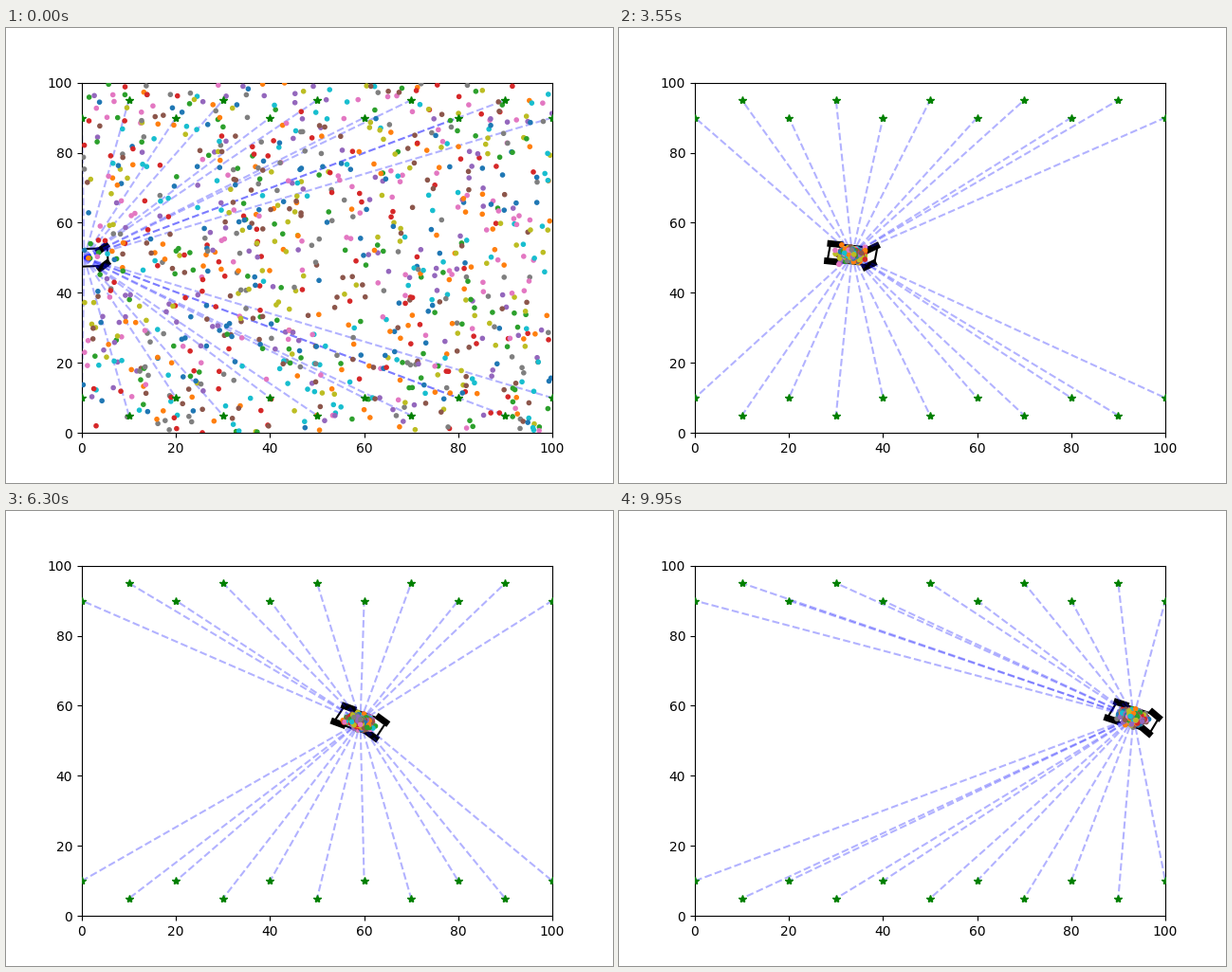
A matplotlib script for the animation above (10 s loop, 640 by 480 pixels).

```python
import numpy as np
import matplotlib.pyplot as plt
from matplotlib.animation import FuncAnimation

FRAMES = 200
INTERVAL = 50
COUNT = 1000
SPEED = 0.5
WHEELBASE = 10
MAX_STEER = 0.75
STEER_PERIOD = 75

BODY = np.array([(-5, -2.5), (5, -2.5), (5, 2.5), (-5, 2.5), (-5, -2.5)])
WHEEL = np.array([(-1, 0), (1, 0)])
MOUNTS = [(-4, 2.5), (-4, -2.5), (4, 2.5), (4, -2.5)]
LANDMARKS = [(x, odd if x % 20 else even)
             for even, odd in ((90, 95), (10, 5))
             for x in range(0, 101, 10)]


def rotate(points, angle):
    c, s = np.cos(angle), np.sin(angle)
    return np.asarray(points) @ np.array([(c, s), (-s, c)])


def drive():
    """Bicycle model: one (x, y, heading, steer) per frame."""
    x, y, heading = 0.0, 50.0, 0.0
    path = []
    for k in range(FRAMES):
        steer = MAX_STEER * np.cos(2 * np.pi * k / STEER_PERIOD)
        heading += SPEED / WHEELBASE * np.tan(steer)
        x += SPEED * np.cos(heading)
        y += SPEED * np.sin(heading)
        path.append((x, y, heading, steer))
    return path


def particles(k, pos, heading):
    """Spread over the whole field at first, then a cloud around the car."""
    rng = np.random.default_rng(k + 7)
    if k == 0:
        return rng.uniform(0, 100, (COUNT, 2))
    spread = 1 + 1.5 * np.exp(-k / 2)
    cloud = rng.normal(0, 1, (COUNT, 2)) * (1.05, 0.75) * spread
    return pos + rotate(cloud, heading)


PATH = drive()

fig, ax = plt.subplots(figsize=(6.4, 4.8), dpi=100)
ax.set_xlim(0, 100)
ax.set_ylim(0, 100)

body, = ax.plot([], [], "k-", lw=1.5)
wheels = [ax.plot([], [], "k-", lw=5)[0] for _ in MOUNTS]
rays = [ax.plot([], [], "b--", lw=1.5, alpha=0.3)[0] for _ in LANDMARKS]
colors = [f"C{i % 10}" for i in range(COUNT)]
dots = ax.scatter(np.zeros(COUNT), np.zeros(COUNT), s=36, marker=".",
                  c=colors, linewidths=1, zorder=3)
ax.plot(*zip(*LANDMARKS), "g*", ms=6, zorder=4)


def update(k):
    x, y, heading, steer = PATH[k]
    pos = np.array([x, y])
    dots.set_offsets(particles(k, pos, heading))
    body.set_data(*(pos + rotate(BODY, heading)).T)
    for wheel, mount in zip(wheels, MOUNTS):
        angle = steer if mount[0] > 0 else 0
        shape = rotate(WHEEL, angle) + mount
        wheel.set_data(*(pos + rotate(shape, heading)).T)
    for ray, (lx, ly) in zip(rays, LANDMARKS):
        ray.set_data([x, lx], [y, ly])
    return [body, *wheels, *rays, dots]


anim = FuncAnimation(fig, update, frames=FRAMES, interval=INTERVAL,
                     init_func=lambda: update(0), repeat=True, repeat_delay=0)
plt.show()
```
